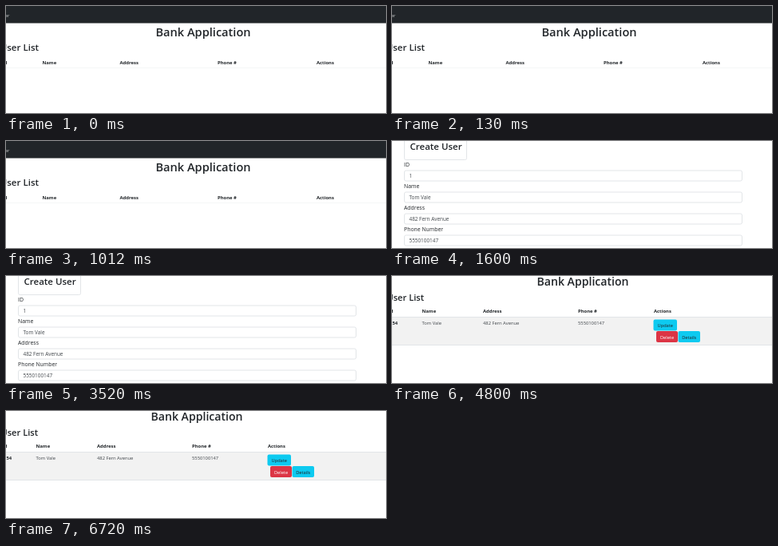
An HTML page for the animation above (8000 ms loop, 476x134 px).

```html
<!DOCTYPE html>
<html lang="en">
<head>
<meta charset="utf-8">
<title>Bank Application</title>
<style>
  html, body { margin: 0; width: 100%; height: 100%; overflow: hidden; background: #fff; }
  svg { display: block; width: 476px; height: 134px; font-family: "Open Sans", "Noto Sans", sans-serif; }
</style>
</head>
<body>
<svg viewBox="0 0 476 134"></svg>
<script>
const svg = document.querySelector("svg");
const INK = "#212529", SOFT = "#41464b", LINE = "#e2e5e8", CYAN = "#0dcaf0", RED = "#dc3545";
const user = { name: "Tom Vale", address: "482 Fern Avenue", phone: "5550100147" };

const text = (x, y, size, label, { weight = 400, fill = INK, anchor = "start" } = {}) =>
  `<text x="${x}" y="${y}" font-size="${size}" font-weight="${weight}" fill="${fill}" text-anchor="${anchor}">${label}</text>`;
const rect = (x, y, w, h, fill, rx = 0, stroke = "none") =>
  `<rect x="${x}" y="${y}" width="${w}" height="${h}" rx="${rx}" fill="${fill}" stroke="${stroke}"/>`;
const button = (x, y, w, label, fill, ink = INK) =>
  rect(x, y, w, 14, fill, 2) +
  text(x + w / 2, y + 9.5, 5.7, label, { fill: ink, anchor: "middle" });

// Page title, section title and table header row
function listHead(title, section, row, columns) {
  const names = ["Name", "Address", "Phone #", "Actions"];
  return text(title.x, title.y, title.size, "Bank Application", { weight: 600, anchor: "middle" }) +
    text(section.x, section.y, section.size, "User List", { weight: 600, anchor: "end" }) +
    text(1.5, row, 5.9, "Id", { weight: 700, anchor: "end" }) +
    names.map((name, i) => text(columns[i], row, 5.9, name, { weight: 700 })).join("");
}

const emptyList =
  rect(0, 0, 476, 21.5, INK) +
  text(4.5, 13.5, 6, "Create User", { fill: "#c8c9ca", anchor: "end" }) +
  listHead({ x: 247, y: 38, size: 14.6 }, { x: 41, y: 56, size: 11.5 }, 72.5, [45.5, 142.5, 265, 389]) +
  rect(0, 77, 476, 1, "#f5f6f7");

const fields = [["ID", "1"], ["Name", user.name], ["Address", user.address], ["Phone Number", user.phone]];
const form =
  rect(15.5, -5.5, 78, 29, "#fff", 2, LINE) +
  text(22.5, 11, 11.5, "Create User", { weight: 600 }) +
  fields.map(([label, value], i) =>
    text(15, 32 + 27 * i, 6.9, label) +
    rect(15.5, 37 + 27 * i, 423, 13, "#fff", 2, LINE) +
    text(21.5, 46 + 27 * i, 6.4, value, { fill: SOFT })).join("");

const columns = [37.5, 114, 233, 328];
const filledList =
  listHead({ x: 239, y: 12, size: 14.1 }, { x: 40, y: 31, size: 11.1 }, 46, columns) +
  rect(0, 52, 476, 34, "#f2f2f2") + rect(0, 51, 476, 1, LINE) + rect(0, 86, 476, 1, LINE) +
  text(7, 61, 5.8, "54", { weight: 700, anchor: "end" }) +
  [user.name, user.address, user.phone].map((value, i) => text(columns[i], 61, 5.8, value, { fill: SOFT })).join("") +
  button(327.5, 54.5, 29.5, "Update", CYAN) +
  button(331, 69, 27, "Delete", RED, "#fff") +
  button(358.5, 69, 27.5, "Details", CYAN);

const scenes = [emptyList, form, filledList];
svg.innerHTML = scenes.map(scene => `<g>${scene}</g>`).join("");

function draw() {
  const t = performance.now() % 8000;
  const active = t < 1600 ? 0 : t < 4800 ? 1 : 2;
  [...svg.children].forEach((group, i) => group.style.display = i === active ? "" : "none");
  requestAnimationFrame(draw);
}
draw();
</script>
</body>
</html>
```
